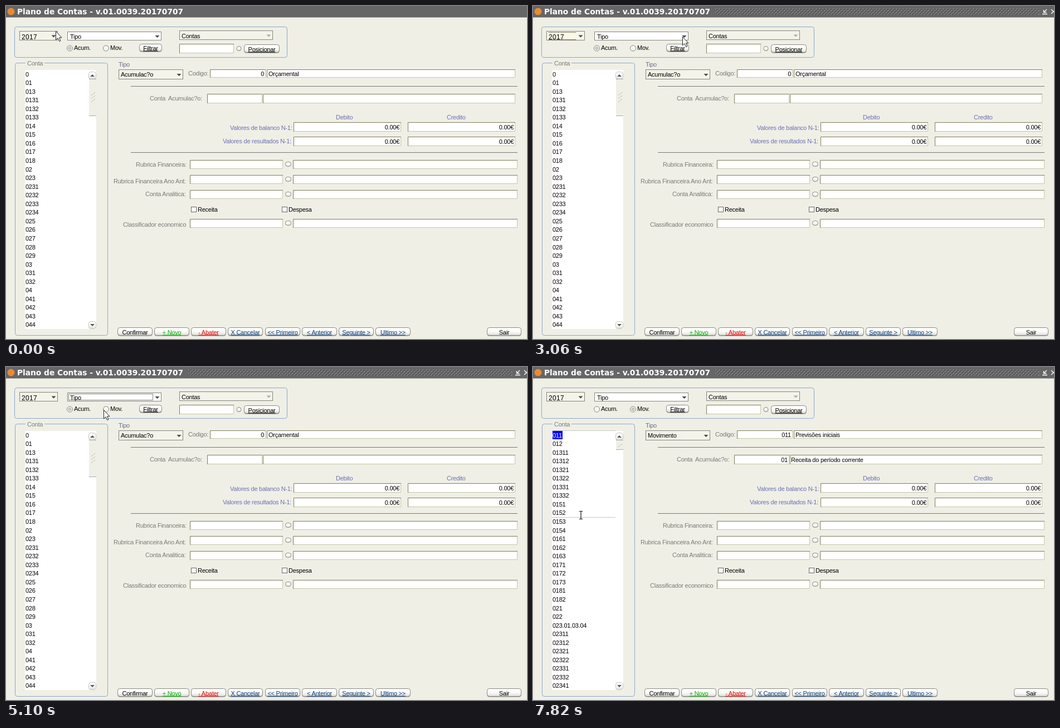
An HTML page that plays this animation: 935x599 px, repeating every 8 s.

```html
<!DOCTYPE html>
<html lang="pt">
<head>
<meta charset="utf-8">
<title>Plano de Contas</title>
<style>
html, body { margin: 0; width: 100%; height: 100%; overflow: hidden; background: #efefe6; }
svg { display: block; width: 935px; height: 599px; }
text { font: 11px "Liberation Sans", Arial, sans-serif; letter-spacing: -.25px; white-space: pre; fill: #000; }
.title { font: bold 13.75px "DejaVu Sans", Verdana, sans-serif; letter-spacing: 0; fill: #fff; }
.year { font-size: 12px; letter-spacing: .3px; }
.gray { fill: #7c7c78; }
.blue { fill: #6c70b4; }
.slate { fill: #6a6f90; }
.inv { fill: #fff; }
.end { text-anchor: end; }
.mid { text-anchor: middle; }
.line { fill: none; stroke: #777; }
.dots { fill: none; stroke: #111; stroke-dasharray: 1 1; }
.group { fill: none; stroke: #8ca8c6; }

.anim, #pointer { animation: 8s step-end infinite; }
#grip { animation-name: grip; }
#yearMenu { animation-name: yearMenu; }
#yearFocus { animation-name: yearFocus; }
#typeMenu { animation-name: typeMenu; }
#typeFocus { animation-name: typeFocus; }
#acumDot { animation-name: acumDot; }
#movDot { animation-name: movDot; }
#movFocus { animation-name: movFocus; }
#before { animation-name: before; }
#after { animation-name: after; }
#picked { animation-name: picked; }
#beam { animation-name: beam; }
#click1 { animation-name: click1; }
#click2 { animation-name: click2; }
#pointer { animation-name: pointer; }

@keyframes grip { 0% { visibility: hidden } 8.5% { visibility: visible } }
@keyframes yearMenu { 0% { visibility: hidden } 8.5% { visibility: visible } 25.5% { visibility: hidden } }
@keyframes yearFocus { 0% { visibility: hidden } 25.5% { visibility: visible } 42.375% { visibility: hidden } }
@keyframes typeMenu { 0% { visibility: hidden } 42.375% { visibility: visible } 55.25% { visibility: hidden } }
@keyframes typeFocus { 0% { visibility: hidden } 55.25% { visibility: visible } 68% { visibility: hidden } }
@keyframes acumDot { 0% { visibility: visible } 68% { visibility: hidden } }
@keyframes movDot { 0% { visibility: hidden } 68% { visibility: visible } }
@keyframes movFocus { 0% { visibility: hidden } 68% { visibility: visible } 85% { visibility: hidden } }
@keyframes before { 0% { visibility: visible } 89.25% { visibility: hidden } }
@keyframes after { 0% { visibility: hidden } 89.25% { visibility: visible } }
@keyframes picked { 0% { visibility: hidden } 93.5% { visibility: visible } }
@keyframes beam { 0% { visibility: hidden } 97.75% { visibility: visible } }
@keyframes click1 { 0% { visibility: hidden } 4.25% { visibility: visible } 8.5% { visibility: hidden } }
@keyframes click2 { 0% { visibility: hidden } 55.25% { visibility: visible } 59.5% { visibility: hidden } }
@keyframes pointer {
  0% { transform: translate(89px, 45px); visibility: visible }
  12.625% { transform: translate(87px, 48px) }
  16.875% { transform: translate(87px, 49px) }
  29.75% { transform: translate(195px, 63px) }
  34% { transform: translate(267px, 57px) }
  38.25% { transform: translate(268px, 55px) }
  42.375% { transform: translate(269px, 55px) }
  59.5% { transform: translate(262px, 61px) }
  63.75% { transform: translate(175px, 77px) }
  68% { transform: translate(177px, 75px) }
  76.5% { transform: translate(237px, 95px) }
  80.75% { transform: translate(264px, 82px) }
  85% { transform: translate(260px, 76px) }
  93.5% { transform: translate(139px, 131px); visibility: visible }
  97.75% { transform: translate(139px, 131px); visibility: hidden }
}
</style>
</head>
<body>
<svg id="stage" viewBox="0 0 935 599"></svg>
<script>
const rect = (x, y, x2, y2, fill, more = '') =>
  `<rect x="${x}" y="${y}" width="${x2 - x}" height="${y2 - y}" fill="${fill}" ${more}/>`;
const text = (x, y, s, cls = '', more = '') =>
  `<text x="${x}" y="${y}" class="${cls}" ${more}>${s.replace(/</g, '&lt;')}</text>`;
const path = (d, cls = 'line', more = '') => `<path d="${d}" class="${cls}" ${more}/>`;
const anim = (id, ...parts) => `<g id="${id}" class="anim">${parts.join('')}</g>`;

const field = (x, y, x2, y2) => rect(x, y, x2, y2, '#fff') +
  path(`M${x + .5} ${y2 - .5}H${x2 - .5}V${y + .5}`, '', 'fill="none" stroke="#c3c7a2"') +
  path(`M${x + .5} ${y2}V${y + .5}H${x2}`, '', 'fill="none" stroke="#7d7d5c"');

const arrow = (x, y, fill = '#444', up = 1) => `<path d="M${x - 4} ${y}h8l-4 ${4 * up}z" fill="${fill}"/>`;

const combo = (x, y, x2, y2, fill, ink) =>
  rect(x + .5, y + .5, x2 - .5, y2 - .5, fill, 'stroke="#85857c"') +
  arrow(x2 - 7.5, (y + y2) / 2 - 1, ink);

const button = (x, y, x2, y2, label, color = '#000000', ruled = true) =>
  rect(x + .5, y + 1.5, x2 - .5, y2 - .5, '#777', 'rx="4"') +
  rect(x + .5, y + .5, x2 - .5, y2 - 1.5, 'url(#face)', 'rx="4" stroke="#8a8a84"') +
  text((x + x2) / 2, y2 - 3.5, label, 'mid',
    `style="fill:${color}${ruled ? `;text-decoration:underline ${color}88` : ''}"`);

const pill = (cx, cy, rx = 5, ry = 4) =>
  `<rect x="${cx - rx}" y="${cy - ry}" width="${rx * 2}" height="${ry * 2}" rx="4" fill="url(#face)" stroke="#85857f"/>`;

const radio = cx => `<circle cx="${cx}" cy="76" r="5" fill="#f8f8f3" stroke="#85857f"/>`;
const radioDot = cx => `<circle cx="${cx}" cy="76" r="2.5" fill="#d0d0ca" stroke="#aaa"/>`;

const rows = codes => codes.split(' ').map((s, i) => text(35, Math.round(126.5 + i * 15.55), s)).join('');

const thumb = bottom => rect(149, 131, 162, bottom, '#efefe6') +
  path(`M149 131.5H162M149 ${bottom - .5}H162`, 'line', 'style="stroke:#aaa"');
const ridges = (y, n) => Array.from({ length: n }, (_, i) =>
  path(`M153 ${y + i * 6}l3 -3m1 0l3 -3`, 'line', 'style="stroke:#b5b5ad"')).join('');

const menu = (x, y, x2, y2, fill, selBottom, items, top, step, cls = '') =>
  rect(x, y, x2, y2, fill, 'rx="2" stroke="#111" stroke-width="1.4"') +
  rect(x + 2, y + 1.5, x2 - 1.5, selBottom, '#00f') +
  items.map((s, i) => text(x + 4, Math.round(top + i * step), s, cls + (i ? '' : ' inv'))).join('');

const defs = `<defs>
  <linearGradient id="face" x2="0" y2="1"><stop stop-color="#fff"/><stop offset=".55" stop-color="#fafaf7"/><stop offset="1" stop-color="#dcdcd5"/></linearGradient>
  <linearGradient id="box" x2="1" y2="0"><stop stop-color="#f1f1e8"/><stop offset="1" stop-color="#f5f5ea"/></linearGradient>
  <pattern id="bumps" x="328" y="5" width="6" height="6" patternUnits="userSpaceOnUse">
    <path d="M0 0h1v1h-1zM3 3h1v1h-1z" fill="#ddd"/><path d="M1 1h1v1h-1zM4 4h1v1h-1z" fill="#111"/>
  </pattern></defs>`;

const titleBar = rect(0, 0, 935, 20, '#666') + path('M0 20.5H935', 'line', 'style="stroke:#a5a5a0"') +
  '<circle cx="9" cy="10" r="6.5" fill="#e98a33"/>' +
  text(20, 15, 'Plano de Contas - v.01.0039.20170707', 'title') +
  anim('grip', rect(328, 5, 908, 16, 'url(#bumps)'),
    path('M914 14.5h9M922 6l-5 5M916.5 7v4.5h5M930 6l8 8M930 14l8 -8', '', 'fill="none" stroke="#fff" stroke-width="1.3"'));

const filters = rect(15.5, 37.5, 504.5, 92.5, 'none', 'rx="4" class="group"') +
  combo(24, 45, 93, 62, 'url(#box)') +
  anim('yearFocus', rect(25, 46, 78, 61, '#f9f9e4'), path('M28 47.5H77M28 60.5H77', 'dots')) +
  text(28, 60, '2017', 'year') +
  combo(110, 46, 279, 62, '#fff') + text(115, 59, 'Tipo') +
  anim('typeFocus', rect(112.5, 48.5, 263.5, 59.5, 'none', 'class="dots"')) +
  combo(311, 44, 479, 61, '#f3f3ea', '#aaa') + text(315, 58, 'Contas') +
  radio(114.5) + anim('acumDot', radioDot(114.5)) + text(122, 79, 'Acum.') +
  radio(179.5) + anim('movDot', radioDot(179.5)) + text(187, 79, 'Mov.') +
  anim('movFocus', path('M175 68.5H211M175 84.5H211', 'line', 'style="stroke:#c4c4bc"')) +
  button(239, 68, 280, 83, 'Filtrar') +
  field(311, 68, 409, 85) + pill(418, 76.5, 4, 4) +
  button(427, 69, 491, 85, 'Posicionar');

const list = rect(16.5, 102.5, 182.5, 592.5, 'none', 'rx="4" class="group"') +
  rect(35, 98, 69, 108, '#efefe6') + text(38, 107, 'Conta', 'gray') +
  rect(34, 115, 162, 581, '#fff') +
  [118, 567].map(y => rect(148.5, y + .5, 161.5, y + 13.5, 'url(#face)', 'rx="4" stroke="#c4c4bc"')).join('') +
  arrow(155, 127, '#555', -1) + arrow(155, 572, '#555');

const before = anim('before', thumb(198), ridges(161, 3),
  rows('0 01 013 0131 0132 0133 014 015 016 017 018 02 023 0231 0232 0233 0234 025 026 027 028 029 03 031 032 04 041 042 043 044'),
  text(206, 127, 'Acumulac?o'), text(463, 126, '0', 'end'), text(471, 126, 'Orçamental'));

const after = anim('after', thumb(149), ridges(144, 1),
  rows('011 012 01311 01312 01321 01322 01331 01332 0151 0152 0153 0154 0161 0162 0163 0171 0172 0173 0181 0182 021 022 023.01.03.04 02311 02312 02321 02322 02331 02332 02341'),
  text(206, 127, 'Movimento'), text(463, 126, '011', 'end'), text(471, 126, 'Previsões iniciais'),
  text(457, 171, '01', 'end'), text(463, 171, 'Receita do período corrente'));

const form = text(202, 109, 'Tipo', 'slate') + combo(202, 114, 318, 132, 'url(#box)') +
  text(327, 125, 'Codigo:', 'gray') + field(366, 114, 466, 129) + field(468, 114, 914, 129) +
  path('M224 144.5H918M224 263.5H918') +
  text(258, 170, 'Conta  Acumulac?o:', 'gray') + field(361, 158, 460, 175) + field(461, 158, 914, 175) +
  text(592, 204, 'Debito', 'blue') + text(791, 204, 'Credito', 'blue') +
  text(402, 223, 'Valores de balanco N-1:', 'blue') + text(389, 247, 'Valores de resultados N-1:', 'blue') +
  [209, 235].map(y => [516, 721].map(x =>
    field(x, y, x + 193, y + 17) + text(x + 190, y + 13, '0.00€', 'end')).join('')).join('') +
  [[233, 289, 277, 'Rubrica Financeira:'], [193, 319, 304, 'Rubrica Financeira Ano Ant:'],
   [250, 342, 331, 'Conta Analitica:'], [210, 397, 383, 'Classificador economico']].map(([x, base, y, s]) =>
    text(x, base, s, 'gray') + field(330, y, 497, y + 16) + pill(506.5, y + 7.5) + field(515, y, 918, y + 16)).join('') +
  [[332, 'Receita'], [495, 'Despesa']].map(([x, s]) =>
    rect(x + .5, 361.5, x + 9.5, 370.5, '#fff', 'stroke="#666"') + text(x + 12, 370, s)).join('');

const navy = '#0a3d7c';
const actions = [['Confirmar', '#000000'], ['+ Novo', '#00b400'], ['- Abater', '#e60000'], ['X Cancelar', navy],
  ['<< Primeiro', navy], ['< Anterior', navy], ['Seguinte >', navy], ['Ultimo >>', navy]].map(([s, color], i) => {
    const x = Math.round(200 + i * 66.15);
    return button(x, 578, x + 63, 594, s, color, i > 0);
  }).join('') + button(863, 578, 925, 594, 'Sair', '#000000', false);

const overlays =
  anim('picked', rect(35, 115, 53, 130, '#00f'), text(35, 127, '011', 'inv')) +
  anim('beam', path('M34 114.5H148M34 270.5H148', 'line', 'style="stroke:#c8c8c8"'),
    path('M83 259.5h2.5l.5 1l.5 -1H89M86 260V273M83 273.5h2.5l.5 -1l.5 1H89', '', 'fill="none" stroke="#111" stroke-width="1.2"')) +
  anim('yearMenu', menu(24, 46.5, 79, 137.3, '#f9f9e6', 66.5, ['2017', '2016', '2015', '2014', '2013'], 62, 17.6, 'year')) +
  anim('typeMenu', menu(110.5, 46.5, 264.7, 132.7, '#fff', 65.5,
    ['Tipo', 'Conta de Acumulac?o', 'Rubrica Financeira', 'Classificador economico', 'Conta Analitica'], 61, 16.6)) +
  [['click1', 89.5, 46.5], ['click2', 270, 57.5]].map(([id, cx, cy]) =>
    anim(id, `<circle cx="${cx}" cy="${cy}" r="9.7" fill="none" stroke="#222" stroke-width="1.2"/>`)).join('') +
  '<path id="pointer" d="M.5 .5V16L4 12.7L6.7 18.5L9 17.5L6.5 11.8H11Z" fill="#fff" stroke="#222"/>';

document.getElementById('stage').innerHTML =
  defs + titleBar + filters + list + form + before + after + actions + overlays;
</script>
</body>
</html>
```
